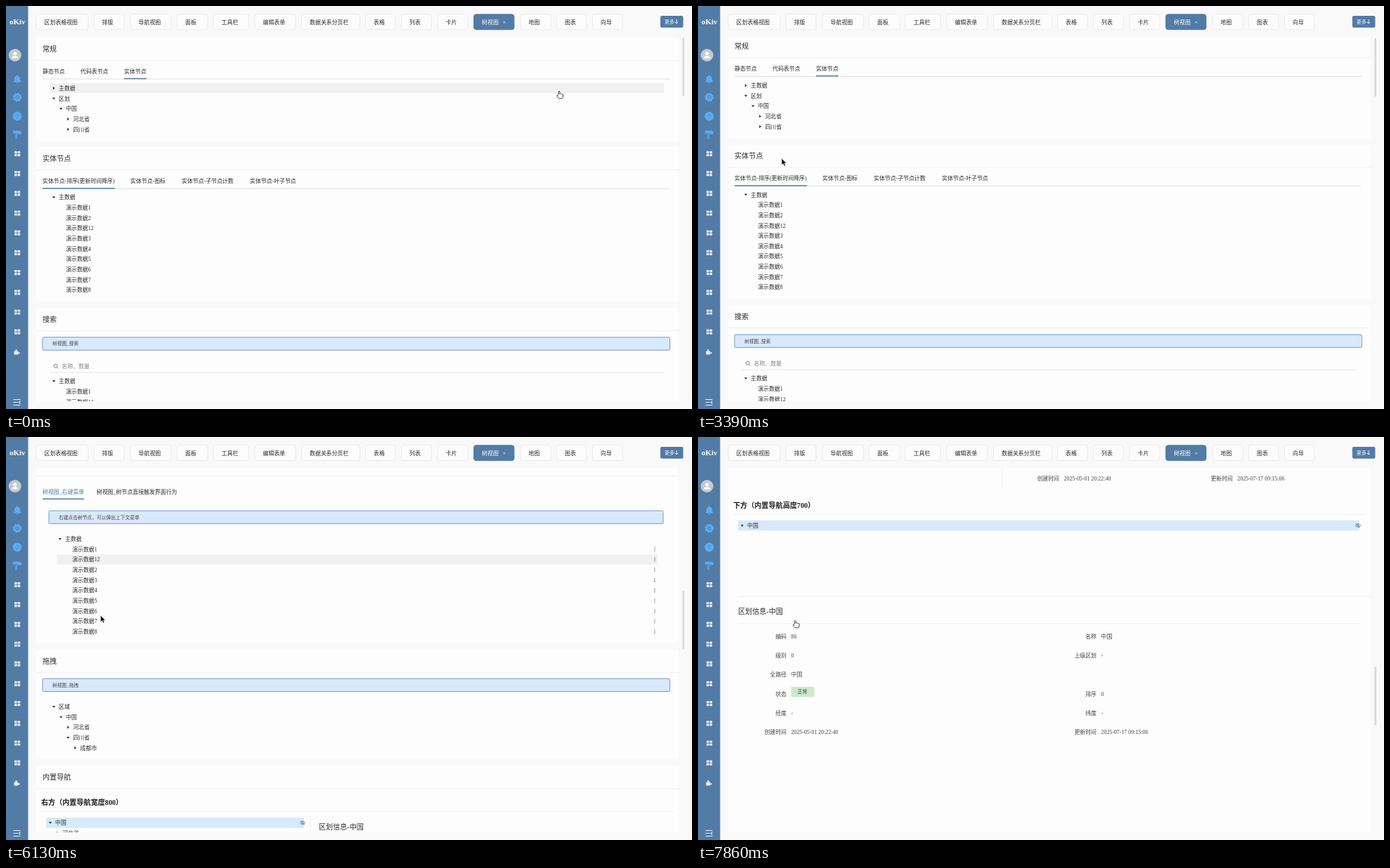
Recreate the animation shown at these times as an HTML page. Size 976 by 574 pixels, loop 8000 ms.

```html
<!DOCTYPE html>
<html lang="zh-CN">
<head>
<meta charset="utf-8">
<title>树视图</title>
<style>
  html, body { margin: 0; width: 100%; height: 100%; overflow: hidden; background: #f9f9f9; }
  svg { display: block; }
  text { font-family: "Liberation Serif", "Noto Sans CJK SC", "Noto Sans CJK", serif; white-space: pre; }
</style>
</head>
<body>
<svg id="stage" width="976" height="574" viewBox="0 0 976 574"></svg>
<script>
const BLUE = '#527ba5', SKY = '#5aaaf5', INK = '#2b2b2b', PALE = '#d7e9fb';
const ROW = 14.65, SMALL = 6.75, BASE = 7.9, BIG = 10.1;

// Text is placed by the vertical centre of its line.
const text = (s, x, y, size = BASE, fill = INK, more = '') =>
  `<text x="${x}" y="${y + size * .37}" font-size="${size}" fill="${fill}" ${more}>${s}</text>`;
const rect = (x, y, w, h, fill, more = '') =>
  `<rect x="${x}" y="${y}" width="${w}" height="${h}" fill="${fill}" ${more}/>`;
const path = (d, fill, more = '') => `<path d="${d}" fill="${fill}" ${more}/>`;
const hline = (x, y, x2, color = '#f1f1f1') => rect(x, y - .5, x2 - x, 1, color);
const at = (x, y, s) => `<g transform="translate(${x} ${y})">${s}</g>`;

const card = (y, end, title) => rect(43, y, 914, end - y, '#fdfdfd', 'rx="2"') +
  text(title, 52, y + 16, BIG) + hline(43, y + 32.5, 957);

const subhead = (s, y) => text(s, 50, y, BIG, '#1c1c1c', 'font-weight="bold"') + hline(50, y + 13.5, 950);

const alertBox = (x, y, w, s) =>
  rect(x, y - 9.2, w, 18.4, PALE, 'stroke="#6d93b9" stroke-width=".9" rx="1.5"') +
  text(s, x + 14, y, SMALL, '#444');

// Each row is a mark (- open, + closed, . leaf), a level and a label.
const tree = (x, y, rows) => rows.map((r, i) => {
  const tx = x + r[1] * 10.2, cy = y + i * ROW;
  const caret = { '-': 'M-2.2-1.2h4.4L0 1.6z', '+': 'M-1.2-2.2v4.4L1.6 0z' }[r[0]];
  return (caret ? at(tx - 7, cy, path(caret, '#333')) : '') + text(r.slice(2), tx, cy);
}).join('');

const demoRows = order => ['-0主数据', ...order.map(n => '.1演示数据' + n)];
const byName = [1, 12, 2, 3, 4, 5, 6, 7, 8];

const eye = (x, y) => at(x, y,
  '<g fill="none" stroke="#64809d" stroke-width=".8"><path d="M-4 0Q0-5 4 0Q0 5-4 0zM-3-3L3 3"/><circle r="1.4"/></g>');

function info(x, y, gap, end) {
  const left = [['编码', '86'], ['级别', '0'], ['全路径', '中国'], ['状态', ''], ['经度', '-'], ['创建时间', '2025-05-01 20:22:40']];
  const right = [['名称', '中国'], ['上级区划', '-'], , ['排序', '0'], ['纬度', '-'], ['更新时间', '2025-07-17 09:15:06']];
  const column = (rows, cx) => rows.map(([label, value], i) => {
    const cy = y + 36 + i * 27.1;
    return text(label, cx, cy, BASE, '#444', 'text-anchor="end"') + text(value, cx + 6.5, cy, BASE, '#444');
  }).join('');
  return text('区划信息-中国', x, y, BIG) + hline(x, y + 17.5, end) +
    column(left, x + 69) + column(right, x + gap) +
    rect(x + 75.5, y + 107.5, 33, 14.5, '#cbe8cd', 'rx="2"') + text('正常', x + 84.5, y + 114.5, 7, '#2f4a36');
}

const nav = y => rect(57, y - 7.3, 367, 14.6, PALE) + eye(422, y) +
  tree(70, y, ['-0中国', '+1河北省', '-1四川省', '-2成都市', '.3锦江区', '.3青羊区', '.3金牛区', '.3武侯区', '+3郫县']) +
  rect(432.5, y - 9, 1, 201, '#f1f1f1') + info(445, y + 6, 316, 948);

const tabRow = (y, tabs) => tabs.map(([s, x, fill]) => text(s, x, y, BASE, fill)).join('');

const dots = (x, y) => [-2.2, 0, 2.2].map(d => `<circle cx="${x}" cy="${y + d}" r=".65" fill="#555"/>`).join('');

const cards =
  card(45, 192, '常规') + card(201, 421, '实体节点') + card(430, 682.5, '搜索') +
  card(691.5, 1081, '导航传参') + card(1091.5, 1362, '上下文菜单') +
  card(1371.5, 1527, '拖拽') + card(1537, 2400, '内置导航');

const content =
  tabRow(93, [['静态节点', 52], ['代码表节点', 106], ['实体节点', 168]]) +
  hline(52, 104, 945, '#dcdfe3') + rect(168, 102.7, 32, 1.5, BLUE) +
  tree(75, 117, ['+0主数据', '-0区划', '-1中国', '+2河北省', '+2四川省']) +

  tabRow(249, [['实体节点-排序(更新时间降序)', 52], ['实体节点-图标', 177], ['实体节点-子节点计数', 250], ['实体节点-叶子节点', 347]]) +
  hline(52, 260, 943, '#dcdfe3') + rect(52, 259, 103, 1.5, BLUE) +
  tree(75, 272.5, demoRows([1, 2, 12, 3, 4, 5, 6, 7, 8])) +

  alertBox(52, 481, 892.5, '树视图_搜索') +
  '<g fill="none" stroke="#777" stroke-width=".9"><circle cx="70.6" cy="512.6" r="2.5"/><path d="M72.5 514.5l2 2"/></g>' +
  text('名称、数量', 79.5, 513, BASE, '#888') + hline(62, 522, 935, '#e6e6e6') +
  tree(75, 534.3, demoRows(byName)) +

  subhead('上下级节点传参', 743) + tree(70, 772.8, ['-0区划', '-1中国', '.2河北省', '.2四川省']) +
  subhead('节点视图传参', 847) + nav(877.5) +

  tabRow(1146.3, [['树视图_右键菜单', 52, BLUE], ['树视图_树节点直接触发界面行为', 129]]) +
  rect(52, 1156, 59, 1.5, BLUE) +
  alertBox(61, 1182.7, 874, '右键点击树节点，可以弹出上下文菜单') +
  tree(84, 1213.7, demoRows(byName)) + byName.map((_, i) => dots(923, 1213.7 + (i + 1) * ROW)).join('') +

  alertBox(52, 1421.8, 892.5, '树视图_拖拽') +
  tree(75, 1452.7, ['-0区域', '-1中国', '+2河北省', '-2四川省', '+3成都市']) +

  subhead('右方（内置导航宽度800）', 1588.5) + nav(1618) +
  subhead('下方（内置导航高度700）', 1832.8) +
  rect(57, 1854.7, 884, 14.6, PALE) + tree(70, 1862, ['+0中国']) + eye(939, 1862) +
  hline(57, 1963.5, 957) + info(57, 1984.3, 510, 943);

const tabs = [['区划表格视图', 43, 117], ['排版', 125, 168], ['导航视图', 177, 235], ['面板', 243.5, 287], ['工具栏', 295, 345],
  ['编辑表单', 354, 412], ['数据关系分页栏', 420.5, 503.5], ['表格', 511.5, 554], ['列表', 562.5, 605], ['卡片', 614, 657],
  ['树视图', 665.5, 723], ['地图', 732, 775], ['图表', 783.5, 826], ['向导', 834.5, 877]];
const header = tabs.map(([s, x, x2]) => {
  const on = s === '树视图';
  return rect(x, 11.7, x2 - x, 22, on ? BLUE : '#fcfcfc', `rx="3.5" stroke="${on ? BLUE : '#e9e9e9'}" stroke-width=".8"`) +
    text(s, x + 11.6, 23, BASE, on ? '#fff' : INK) + (on ? text('×', 706.5, 23, 8, '#fff') : '');
}).join('') + rect(931, 14, 32.5, 16.7, BLUE, 'rx="2"') + text('更多', 937, 22, 7, '#fff') +
  path('M954 19v6m-2-2l2 2l2-2', 'none', 'stroke="#fff" stroke-width=".9"');

const quad = [[-4, -3.5], [.5, -3.5], [-4, .5], [.5, .5]].map(([x, y]) => rect(x, y, 3.7, 3.2, '#e4edf6', 'rx=".7"')).join('');
const side = rect(0, 0, 31.5, 574, BLUE) +
  text('oKiv', 16.2, 22, 11, '#fff', 'font-weight="bold" text-anchor="middle"') +
  at(12.8, 70, `<circle r="9" fill="#c5c9cd"/><circle cy="-2.2" r="2.5" fill="#fff"/>${path('M-4.6 4.6Q-4.6 1 0 1Q4.6 1 4.6 4.6z', '#fff')}`) +
  at(16, 104.5, path('M-5.5 4Q-4 2-4-1Q-4-4.5-1-5V-6h2v1Q4-4.5 4-1Q4 2 5.5 4zM-1.5 4.8h3l-1.5 1.6z', SKY)) +
  at(16, 130, `<circle r="4" fill="${BLUE}" stroke="${SKY}" stroke-width="3"/><circle r="5.6" fill="none" stroke="${SKY}" stroke-width="1.8" stroke-dasharray="2.4 2"/><circle r="1.5" fill="${SKY}"/>`) +
  at(16, 157, `<circle r="6.5" fill="${SKY}"/>` + text('?', 0, 0, 9, BLUE, 'text-anchor="middle"')) +
  at(16, 183.5, path('M-6-6H4v1h2v4H1v1H-.5V6h-2V-1H1V-2H-6z', SKY)) +
  Array.from({ length: 10 }, (_, i) => at(16, 210.3 + i * 28.2, quad)).join('') +
  at(15.5, 492.5, path('M-4-1h2v-2.5h2V-1h2v2h2.5v1.5H2V4h-6z', '#e4edf6')) +
  at(15.5, 564.5, path('M-5-4H5M-5 0H1.5M-5 4H5M5-2L2.8 0L5 2', 'none', 'stroke="#e4edf6" stroke-width="1.1"'));

const hand = path('M-.9 5.5V.8Q0-.4 .9.8V4Q2 3.4 2.6 4.3Q3.8 3.8 4.2 4.7Q5.6 4.4 5.7 5.8L5.2 9L4.4 10.8H-.4L-3.2 7Q-3.2 5.6-1.8 6.2z', '#fff', 'stroke="#333" stroke-width=".9"');
const arrow = path('M0 0V9.6L2.2 7.6L3.8 11L5.5 10.2L3.9 7H6.8z', '#111', 'stroke="#fff" stroke-width=".5"');

const $ = id => document.getElementById(id);
$('stage').innerHTML = `<clipPath id="view"><rect x="43" y="45" width="915" height="518"/></clipPath>
  ${rect(0, 0, 976, 574, '#f9f9f9')}${side}${header}
  <g clip-path="url(#view)"><g id="page">${cards}${rect(0, 0, 0, 14.2, '#f1f1f1', 'id="hover"')}${content}</g></g>
  ${rect(962.6, 45, 2.4, 83.5, '#d5d8dc', 'rx="1.2" id="thumb"')}
  <g id="cursor"><g id="hand">${hand}</g><g id="arrow">${arrow}</g></g>`;

// Keys: time, then values; motion eases between neighbouring keys.
const scrollKeys = [[0, 0], [3330, 0], [4210, 323.5], [4800, 323.5], [4950, 392], [5120, 392], [5420, 730],
  [5740, 730], [6130, 1068.5], [6850, 1068.5], [7190, 1406.5], [7620, 1406.5], [7860, 1736]];
const cursorKeys = [[0, 787, 121], [110, 787, 121], [610, 480, 118], [780, 480, 118], [1300, 130, 107], [1880, 130, 107],
  [2100, 64.5, 97], [2800, 64.5, 97], [3140, 119, 217], [4800, 119, 217], [5420, 129.5, 242], [5740, 129.5, 242],
  [6130, 134.5, 254], [6490, 134.5, 254], [7190, 139, 261], [7860, 138.5, 261]];
// Hovered row: start, end, x, centre y, width.
const hovers = [[0, 1000, 62, 117, 874], [5980, 6210, 72, 1243, 855], [6210, 6850, 72, 1330.9, 855], [7150, 7620, 57, 1662, 367]];

function sample(keys, t) {
  const i = keys.findIndex(k => k[0] > t);
  if (i < 0) return keys[keys.length - 1].slice(1);
  const [a, b] = [keys[i - 1], keys[i]];
  const p = (1 - Math.cos(Math.PI * (t - a[0]) / (b[0] - a[0]))) / 2;
  return a.slice(1).map((v, j) => v + (b[j + 1] - v) * p);
}

function draw(now) {
  const t = now % 8000, [scroll] = sample(scrollKeys, t), [x, y] = sample(cursorKeys, t);
  $('page').setAttribute('transform', `translate(0 ${-scroll})`);
  $('thumb').setAttribute('y', 45 + scroll * .1625);
  $('cursor').setAttribute('transform', `translate(${x} ${y})`);
  const pointing = t < 2860 || t >= 7700;
  $('hand').style.display = pointing ? '' : 'none';
  $('arrow').style.display = pointing ? 'none' : '';
  const [, , hx, hy, hw] = hovers.find(h => t >= h[0] && t < h[1]) || [0, 0, 0, 0, 0];
  $('hover').setAttribute('x', hx);
  $('hover').setAttribute('y', hy - 7.1);
  $('hover').setAttribute('width', hw);
}

const start = performance.now();
(function loop() {
  draw(performance.now() - start);
  requestAnimationFrame(loop);
})();
</script>
</body>
</html>
```
